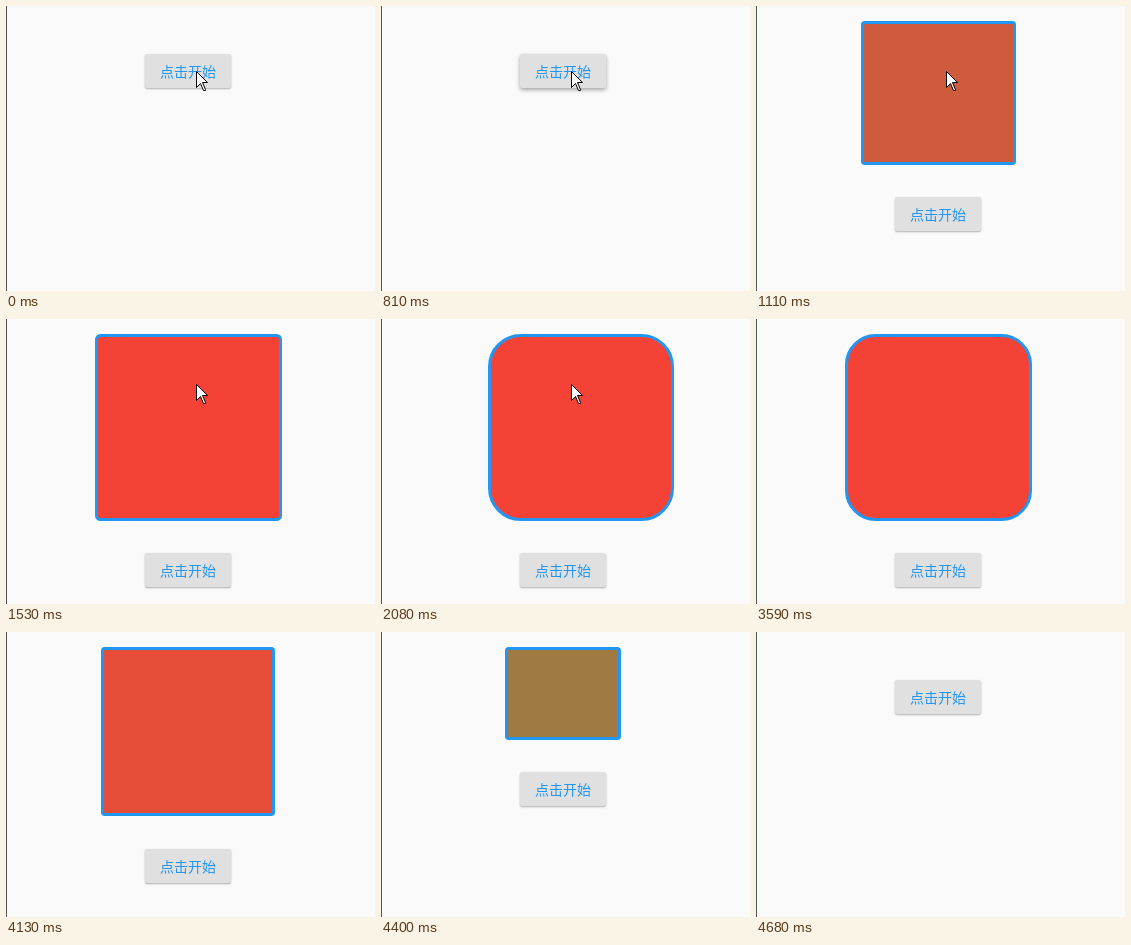
An HTML page that plays this animation: 369 px wide and 285 px high, repeating every 4.96 s.

```html
<!DOCTYPE html>
<html lang="zh-CN">
<head>
<meta charset="utf-8">
<style>
  html, body { margin: 0; width: 100%; height: 100%; overflow: hidden; background: #fafafa; }
  #edge { position: absolute; left: 0; top: 0; width: 1px; height: 100%; background: #555; }
  #box { position: absolute; top: 15px; box-sizing: border-box; border: 3px solid #2196f3; }
  #button {
    position: absolute; left: 139px; width: 86px; height: 34px; border-radius: 2px;
    background: #e0e0e0; color: #2196f3; text-align: center;
    font: 14px/34px "Noto Sans CJK SC", "Noto Sans CJK", sans-serif;
  }
  #cursor { position: absolute; left: 190px; top: 65px; }
</style>
</head>
<body>
<div id="edge"></div>
<div id="box"></div>
<div id="button">点击开始</div>
<svg id="cursor" width="14" height="22">
  <path d="M.5.5v16l4-4 3 7h2v-1l-3-7h5z" fill="#fff" stroke="#000"/>
</svg>
<script>
const LOOP = 4960;
const PRESS = 810;
const SCALE = 0.9325;
const CENTER = 182.3;

const steps = [0, 250, 810, 960, 1110, 1260, 1390, 1530, 1650, 1800, 1960, 2080, 2200,
  2340, 2470, 2590, 2730, 2860, 3010, 3160, 3290, 3440, 3590, 3710, 3860, 3980, 4130,
  4250, 4400, 4530, 4680];

const [box, button, cursor] = ["box", "button", "cursor"].map(id => document.getElementById(id));
const mix = (a, b, k) => a + (b - a) * k;

// cubic-bezier(.25, .1, .25, 1)
function ease(x) {
  if (x <= 0) return 0;
  if (x >= 1) return 1;
  const bez = (a, b, s) => 3 * (1 - s) * s * ((1 - s) * a + s * b) + s ** 3;
  let lo = 0, hi = 1;
  for (let i = 0; i < 24; i++) {
    const mid = (lo + hi) / 2;
    if (bez(0.25, 0.25, mid) < x) lo = mid; else hi = mid;
  }
  return bez(0.1, 1, lo);
}

// Eases 0 to 1 over the first span and back to 0 over the second.
const swing = (t, upStart, upEnd, downStart, downEnd) =>
  ease(Math.min((t - upStart) / (upEnd - upStart), (downEnd - t) / (downEnd - downStart)));

function draw(t) {
  const grow = t > PRESS ? swing(t, 778, 1483, 3845, 4629) : 0;
  const round = swing(t, 1500, 1890, 3465, 3850);
  const shift = swing(t, 1890, 2690, 2700, 3461);

  const width = mix(50, 200, grow) * SCALE;
  const height = 200 * SCALE * grow;
  const rgb = [[76, 244], [175, 67], [80, 54]].map(([a, b]) => Math.round(mix(a, b, grow)));

  Object.assign(box.style, {
    display: height ? "block" : "none",
    left: CENTER - width / 2 + 50 * SCALE * shift + "px",
    width: width + "px",
    height: height + "px",
    borderRadius: mix(4, 35, round) * SCALE + "px",
    backgroundColor: `rgb(${rgb})`
  });
  button.style.top = 48 + Math.floor(height) + "px";
  button.style.boxShadow = t === PRESS
    ? "0 2px 4px rgba(0,0,0,.35)"
    : "0 1px 2px rgba(0,0,0,.3)";
  cursor.style.display = t < 250 || (t >= PRESS && t < 2470) ? "block" : "none";
}

const start = performance.now();
function tick() {
  const now = (performance.now() - start) % LOOP;
  draw(steps.findLast(s => s <= now) ?? 0);
  requestAnimationFrame(tick);
}
tick();
</script>
</body>
</html>
```
